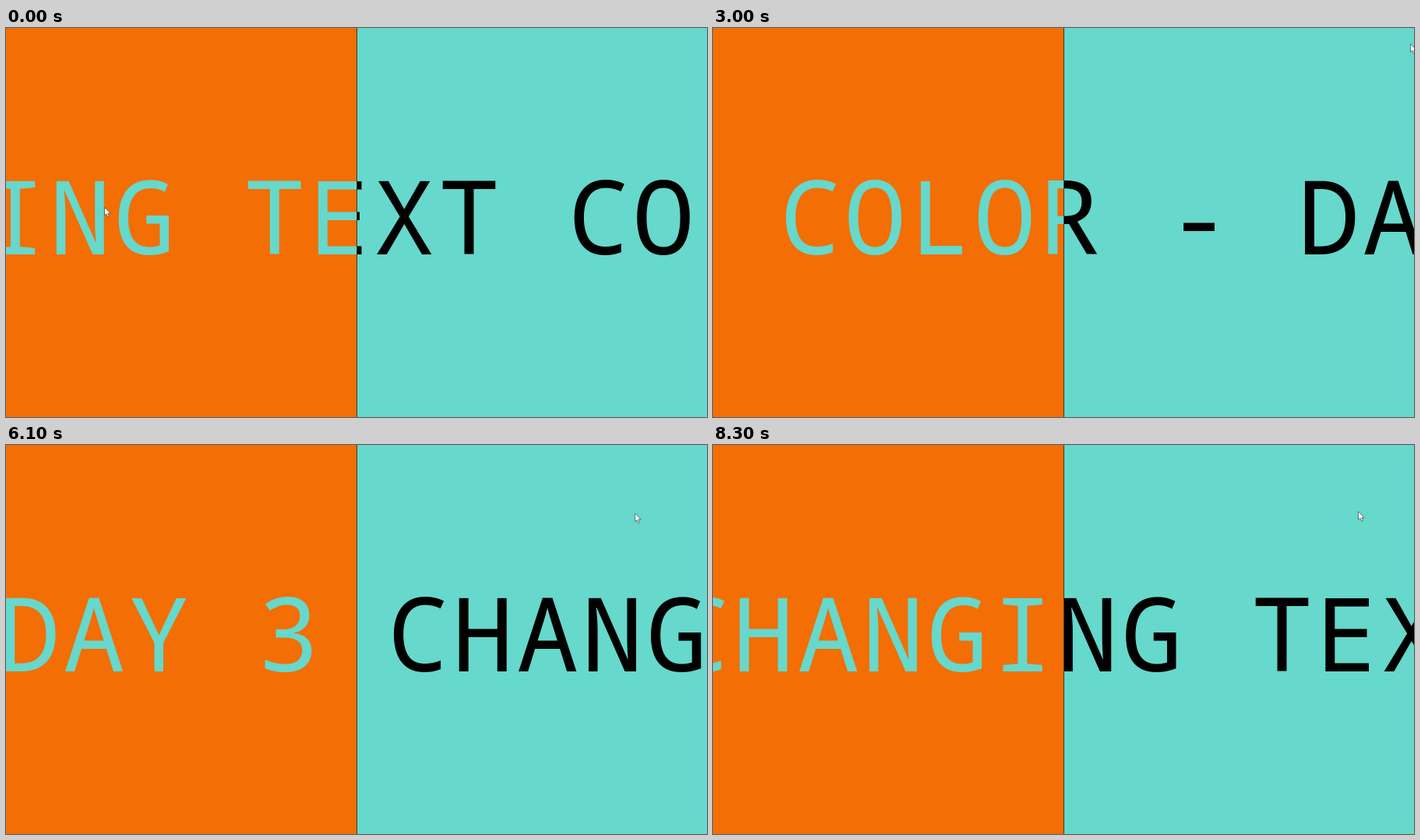
An HTML page with a canvas that plays this animation: 900x500 px, repeating every 8.4 s.

```html
<!DOCTYPE html>
<html lang="en">
<head>
<meta charset="utf-8">
<title>Changing text color</title>
<style>
  html, body { margin: 0; width: 100%; height: 100%; overflow: hidden; }
  canvas { display: block; }
</style>
</head>
<body>
<canvas width="900" height="500"></canvas>
<script>
const ctx = document.querySelector('canvas').getContext('2d');
const LOOP = 8400, STEP = 100, SPLIT = 450;
const ORANGE = '#f36e05', TEAL = '#66d8cc';
const PHRASE = 'CHANGING TEXT COLOR - DAY 3 '.repeat(2);
const PITCH = 83.2, BASELINE = 291;

// [time, x of the first letter's centre]
const SCROLL = [[0, -404], [1400, -687], [3000, -1040], [4000, -1271],
  [5300, -1558], [6800, -2013], [8300, -2348]];

// [time, x, y] of the pointer tip
const POINTER = [[0, 126, 230], [900, 893, 12], [1400, 898, 19], [1800, 903, 19],
  [2800, 903, 20], [3000, 895, 20], [4000, 898, 2], [4500, 888, 2],
  [4700, 845, 61], [5300, 796, 88], [6800, 817, 87], [8300, 828, 85]];

function sample(keys, time) {
  const next = Math.max(1, keys.findIndex(key => key[0] >= time));
  const from = keys[next - 1], to = keys[next];
  const k = (time - from[0]) / (to[0] - from[0]);
  return from.slice(1).map((value, i) => value + (to[i + 1] - value) * k);
}

function drawPanel(left, width, background, color, start) {
  ctx.save();
  ctx.beginPath();
  ctx.rect(left, 0, width, 500);
  ctx.clip();
  ctx.fillStyle = background;
  ctx.fillRect(left, 0, width, 500);
  ctx.fillStyle = color;
  ctx.font = '500 132.5px "Noto Sans Mono", monospace';
  ctx.textAlign = 'center';
  [...PHRASE].forEach((letter, i) => {
    const x = start + i * PITCH;
    if (x > -PITCH && x < 900 + PITCH) ctx.fillText(letter, x, BASELINE);
  });
  ctx.restore();
}

function drawPointer(x, y) {
  ctx.save();
  ctx.translate(x + 0.5, y + 0.5);
  ctx.fillStyle = '#fff';
  ctx.strokeStyle = '#455';
  ctx.lineWidth = 0.8;
  const arrow = new Path2D('M0 0V10.5L2.3 8.4L4 12.3L5.8 11.5L4.2 7.8H7.5Z');
  ctx.fill(arrow);
  ctx.stroke(arrow);
  ctx.restore();
}

function draw(time) {
  const [start] = sample(SCROLL, time);
  drawPanel(0, SPLIT, ORANGE, TEAL, start);
  drawPanel(SPLIT, 450, TEAL, '#000', start);
  ctx.fillStyle = '#2b3d3a';
  ctx.fillRect(SPLIT, 0, 1, 500);
  drawPointer(...sample(POINTER, time));
}

function tick() {
  draw(Math.floor(performance.now() % LOOP / STEP) * STEP);
  requestAnimationFrame(tick);
}
tick();
</script>
</body>
</html>
```
